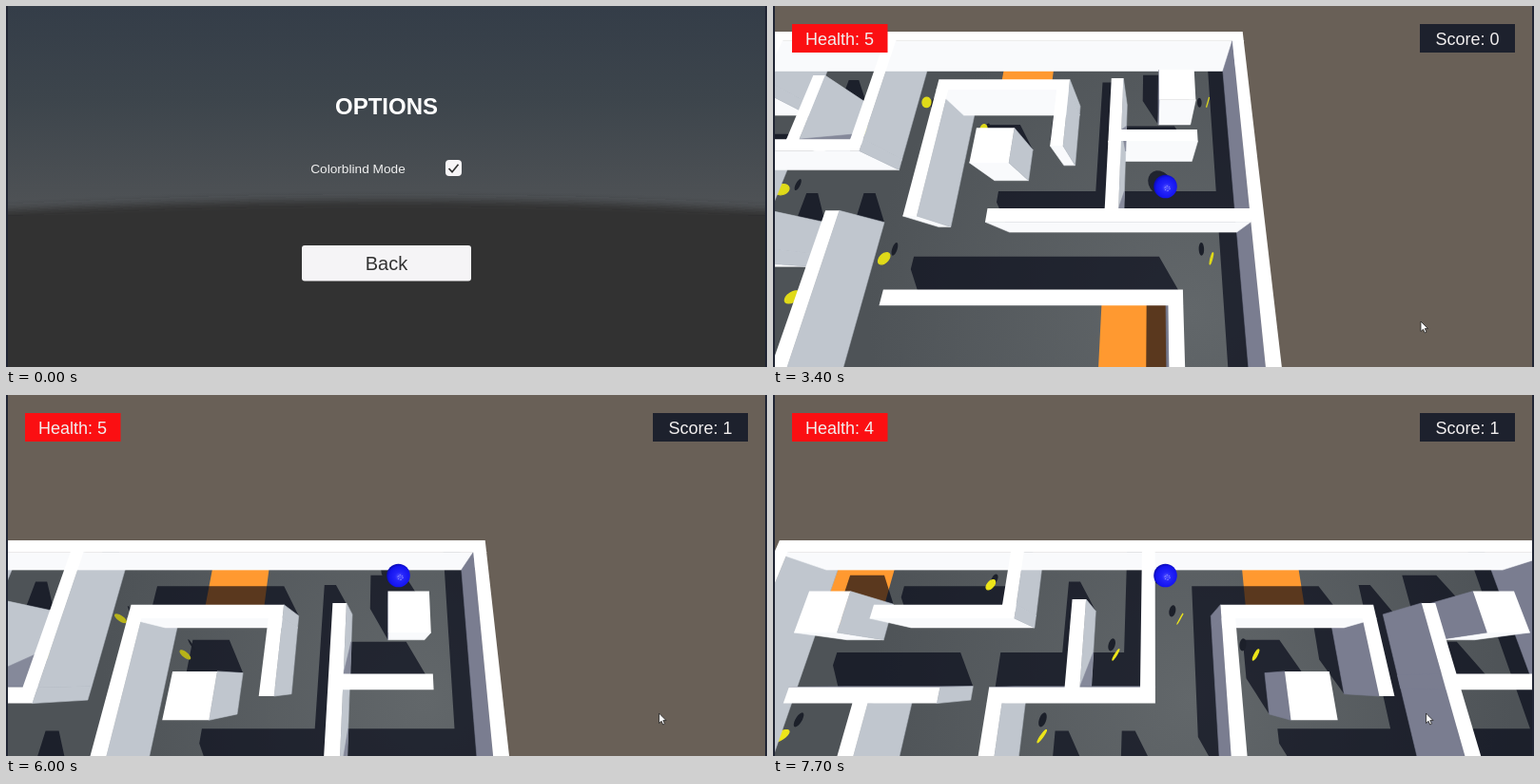
These frames come from a looping animation (800 px wide and 380 px high, 7800 ms). An HTML page:

```html
<!DOCTYPE html>
<html lang="en">
<head>
<meta charset="utf-8">
<title>Maze game</title>
<style>
  html, body { margin: 0; width: 100%; height: 100%; overflow: hidden; background: #1f2433; }
  svg { display: block; width: 800px; height: 380px; font-family: "Liberation Sans", Arial, sans-serif; }
  text { text-anchor: middle; }
  .button rect { fill: #f5f4f6; }
  .button.hover rect { fill: #b9e6cc; }
  .button text { font-size: 20px; fill: #323232; }
  .hud { font-size: 18px; fill: #f1eeee; }
</style>
</head>
<body>
<svg viewBox="0 0 800 380">
  <defs>
    <linearGradient id="sky" x2="0" y2="1">
      <stop offset="0" stop-color="#343d48"/>
      <stop offset=".45" stop-color="#3d454c"/>
      <stop offset="1" stop-color="#505356"/>
    </linearGradient>
    <radialGradient id="ground" gradientUnits="userSpaceOnUse" cx="440" cy="320" r="340">
      <stop offset="0" stop-color="#62676a"/>
      <stop offset="1" stop-color="#4e5357"/>
    </radialGradient>
    <radialGradient id="blue" cx=".55" cy=".55" r=".55">
      <stop offset="0" stop-color="#5a5aff"/>
      <stop offset=".35" stop-color="#2424fa"/>
      <stop offset=".8" stop-color="#1414ee"/>
      <stop offset="1" stop-color="#0c0cb4"/>
    </radialGradient>
    <filter id="soft" x="-10%" y="-20%" width="120%" height="140%"><feGaussianBlur stdDeviation="4"/></filter>
    <clipPath id="stage"><path d="M2 0H798V380H2z"/></clipPath>
  </defs>

  <g clip-path="url(#stage)">
    <g id="menus">
      <rect width="800" height="220" fill="url(#sky)"/>
      <path d="M-40 217Q400 192 840 217V420H-40z" fill="#333" filter="url(#soft)"/>
      <g id="options">
        <text x="400" y="114" font-size="24" font-weight="bold" fill="#fff">OPTIONS</text>
        <text x="370" y="176" font-size="13.7" fill="#f0f0f0">Colorblind Mode</text>
        <rect x="462" y="162" width="17" height="17" rx="4" fill="#f7f5f7"/>
        <path d="M465.5 171l3.5 3.7l6.5-8" fill="none" stroke="#323232" stroke-width="1.7"/>
      </g>
      <g id="main"></g>
    </g>

    <g id="game">
      <rect width="800" height="380" fill="#696057"/>
      <path id="floor" fill="url(#ground)"/>
      <path id="panels" fill="#ff9930"/>
      <path id="shadows" fill="#020614" fill-opacity=".65"/>
      <path id="coinShadows" fill="#1c202a"/>
      <path id="coins" stroke-width="1.2"/>
      <g id="faces" stroke-width=".6"></g>
      <path id="tops" fill="#fff"/>
      <circle cx="412.5" cy="190" r="12.3" fill="url(#blue)"/>
      <circle cx="414.5" cy="192" r="2.6" fill="none" stroke="#a9a9ff" stroke-dasharray="1.2 1.6"/>
      <rect x="20" y="19" width="100.5" height="30" fill="#fb0f12"/>
      <rect x="680" y="19" width="100" height="30" fill="#1d212d"/>
      <text id="health" class="hud" x="70" y="41"></text>
      <text id="score" class="hud" x="730" y="41"></text>
    </g>
    <path id="cursor" d="M0 0V10.5L2.5 8.3L4.2 12L6 11.2L4.3 7.6H7.5z" fill="#fff" stroke="#222" stroke-width=".8"/>
  </g>
</svg>

<script>
const LOOP = 7800, STEP = 100;
const $ = id => document.getElementById(id);
const show = (id, on) => $(id).setAttribute('display', on ? 'inline' : 'none');

const buttons = [];
function button(label, y, parent) {
  $(parent).insertAdjacentHTML('beforeend',
    `<g class="button"><rect x="311" y="${y}" width="178" height="37.5" rx="3"/>` +
    `<text x="400" y="${y + 26}">${label}</text></g>`);
  buttons.push({ node: $(parent).lastElementChild, y });
}
button('Back', 252, 'options');
['Play', 'Options', 'Quit'].forEach((label, i) => button(label, 112 + 60 * i, 'main'));

// World: x grows to the right, s grows towards the viewer, origin at the far right corner.
// The maze lies on a grid whose columns count leftwards and rows count towards the viewer.
const WALL = 2, HALF = .25, LEFT = -29.85, NEAR = 16;
const colX = c => -HALF - 2.5 * c - (c > 5 ? .35 : 0);
const rowS = r => Math.max(HALF, 2.8 * r);
const cell = text => { const [c, r] = text.split(' '); return [colX(+c), rowS(+r)]; };
const square = (text, half) => {
  const [x, s] = cell(text);
  return [x - half, x + half, s - half, s + half];
};

// A route is a start cell followed by compass moves. Walls across the view own the corners.
function wallsAlong(route) {
  let [c, r, ...moves] = route.split(' ');
  c = +c;
  r = +r;
  return moves.map(move => {
    const n = +move.slice(1), c0 = c, r0 = r;
    if (move[0] === 'N') r -= n;
    if (move[0] === 'S') r += n;
    if (move[0] === 'E') c -= n;
    if (move[0] === 'W') c += n;
    const gap = r === r0 ? -HALF : HALF;
    return [colX(Math.max(c, c0)) - HALF, colX(Math.min(c, c0)) + HALF,
      rowS(Math.min(r, r0)) + gap, rowS(Math.max(r, r0)) - gap];
  });
}

const boxes = [
  [LEFT, 0, 0, 2 * HALF], [-2 * HALF, 0, 2 * HALF, NEAR], [LEFT, LEFT + 2 * HALF, 2 * HALF, NEAR],
  ...['3 2.1 N1.1 W2 S2.1', '2.1 .8 S2.2', '2.1 1.85 E1.2', '3.8 3 E3.6', '5 4 E3.8 S2',
    '6 0 S2 W2 S4', '7 .75 S1.25', '8 0 S1 W1.85', '10.65 2 E1.8', '9.75 2 S3',
    '6 2.85 S3', '7 2.85 S.65 W1'].flatMap(wallsAlong),
  ...['1.1 1', '4 2', '10.65 1'].map(b => square(b, .75))
];
const panels = ['4 .6', '1.8 4.55', '11 .6'].map(p => square(p, 1.25));
const coins = ['.5 1', '.6 3.5', '5.5 1', '4.5 1.5', '5.5 3.5', '6.5 1.5', '7.5 2.5',
  '8.6 .5', '11.2 2.5', '6.7 4'].map(cell);

// Walls that meet the right side of another wall throw a shadow along it.
for (const a of boxes)
  a.shades = boxes
    .filter(b => b[0] <= a[1] && a[1] < b[1] && a[2] < b[2] && b[2] <= a[3])
    .map(b => b[2]);

const FOCAL = 329, SIN = .9466, COS = .3223, EYE = 13;
const SHADE_X = -.75, SHADE_S = -1.3;       // shadow offset of a wall top
const cam = { x: 0, s: 0 };

function project([x, h, s]) {
  const z = cam.s - s, drop = EYE - h, depth = z * COS + drop * SIN;
  return (400 + FOCAL * (x - cam.x) / depth).toFixed(1) + ' ' +
         (190 - FOCAL * (z * SIN - drop * COS) / depth).toFixed(1);
}
const poly = points => 'M' + points.map(project).join('L') + 'z';
const flat = ([x0, x1, s0, s1], h) => poly([[x0, h, s0], [x1, h, s0], [x1, h, s1], [x0, h, s1]]);
const ring = point => poly(Array.from({ length: 20 }, (_, i) => point(i / 10 * Math.PI)));

function wallShadow([x0, x1, s0, s1]) {
  const u = SHADE_X, v = SHADE_S;
  return poly([[x0, 0, s1], [x1, 0, s1], [x1, 0, s0],
    [x1 + u, 0, s0 + v], [x0 + u, 0, s0 + v], [x0 + u, 0, s1 + v]]);
}

function ballShadow({ x, s }) {
  return ring(a => {
    const long = .62 * Math.cos(a), wide = .5 * Math.sin(a);
    return [x - .19 + long * .5 + wide * .866, 0, s - .33 + long * .866 - wide * .5];
  });
}

function coinPoint([x, s], spin, a) {
  const reach = .23 * Math.cos(a);
  return [x + reach * Math.cos(spin), .7 + .23 * Math.sin(a), s - reach * Math.sin(spin)];
}
const toFloor = ([x, h, s]) => [x + SHADE_X * h / WALL, 0, s + SHADE_S * h / WALL];

function distance([x0, x1, s0, s1]) {
  return Math.hypot(Math.max(x0 - cam.x, 0, cam.x - x1), Math.max(s0 - cam.s, 0, cam.s - s1));
}

function boxFaces(box) {
  const [x0, x1, s0, s1] = box;
  const path = (points, fill) => `<path d="${poly(points)}" fill="${fill}" stroke="${fill}"/>`;
  const side = (xa, sa, xb, sb, fill) =>
    path([[xa, WALL, sa], [xb, WALL, sb], [xb, 0, sb], [xa, 0, sa]], fill);
  let out = '';
  if (cam.s < s0) out += side(x0, s0, x1, s0, '#7a7d90');
  if (cam.s > s1) out += side(x0, s1, x1, s1, '#f9fafc');
  if (cam.x < x0) out += side(x0, s0, x0, s1, '#7a7d90');
  if (cam.x > x1) {
    out += side(x1, s0, x1, s1, '#c0c6ce');
    for (const s of box.shades)
      out += path([[x1, WALL, s], [x1, 0, s + SHADE_S], [x1, 0, s]], '#85899a');
  }
  return out;
}

// The ball rolls right, then away from the viewer, then left, each time from rest.
function ballAt(t) {
  const run = start => Math.max(0, t - start) ** 2;
  return {
    x: t < 5.3 ? Math.min(-1, -3.5 + 5 * run(3.45)) : Math.max(-14.93, -1 - 4.75 * run(5.3)),
    s: Math.max(.93, 6.8 - 5 * run(4.285))
  };
}

function drawGame(ms) {
  const t = ms / 1000, ball = ballAt(t);
  const collected = ms >= 5100;
  cam.x = ball.x - .48;
  cam.s = ball.s + 4.256;
  const spin = (73 - 45 * (t - 3.4)) * Math.PI / 180;
  const glow = 160 + 88 * Math.abs(Math.cos(spin - Math.PI / 6));
  const gold = `rgb(${glow},${glow * .97},25)`;
  const left = collected ? coins.slice(1) : coins;
  const set = (id, d) => $(id).setAttribute('d', d);
  set('floor', flat([LEFT, 0, 0, NEAR], 0));
  set('panels', panels.map(p => flat(p, 0)).join(''));
  set('shadows', boxes.filter(b => b[0] > LEFT).map(wallShadow).join('') + ballShadow(ball));
  set('coinShadows', left.map(c => ring(a => toFloor(coinPoint(c, spin, a)))).join(''));
  set('coins', left.map(c => ring(a => coinPoint(c, spin, a))).join(''));
  $('coins').setAttribute('fill', gold);
  $('coins').setAttribute('stroke', gold);
  set('tops', boxes.map(b => flat(b, WALL)).join(''));
  $('faces').innerHTML = [...boxes].sort((a, b) => distance(b) - distance(a)).map(boxFaces).join('');
  $('health').textContent = 'Health: ' + (ms >= 6500 ? 4 : 5);
  $('score').textContent = 'Score: ' + (collected ? 1 : 0);
}

function cursorAt(ms) {
  const glide = (start, end) => {
    const p = Math.min(1, Math.max(0, (ms - start) / (end - start)));
    return p * p * (3 - 2 * p);
  };
  const enter = glide(300, 800), toPlay = glide(1700, 2200);
  const away = glide(2600, 3200), drift = glide(3500, 4000);
  return [520 - 45 * enter - 35 * toPlay + 241 * away + 5.5 * drift,
    360 - 99 * enter - 129 * toPlay + 200 * away + 3 * drift];
}

function draw(ms) {
  const playing = ms >= 2600, [cx, cy] = cursorAt(ms);
  show('menus', !playing);
  show('game', playing);
  show('options', ms < 1000);
  show('main', ms >= 1000);
  show('cursor', ms >= 300);
  $('cursor').setAttribute('transform', `translate(${cx} ${cy})`);
  if (playing) return drawGame(ms);
  for (const { node, y } of buttons) {
    const over = ms >= 300 && Math.abs(cx - 400) < 89 && cy > y && cy < y + 37.5;
    node.classList.toggle('hover', over);
  }
}

let shown = -1;
const origin = performance.now();
function tick() {
  const ms = Math.floor(Math.max(0, performance.now() - origin) % LOOP / STEP) * STEP;
  if (ms !== shown) draw(shown = ms);
  requestAnimationFrame(tick);
}
tick();
</script>
</body>
</html>
```
